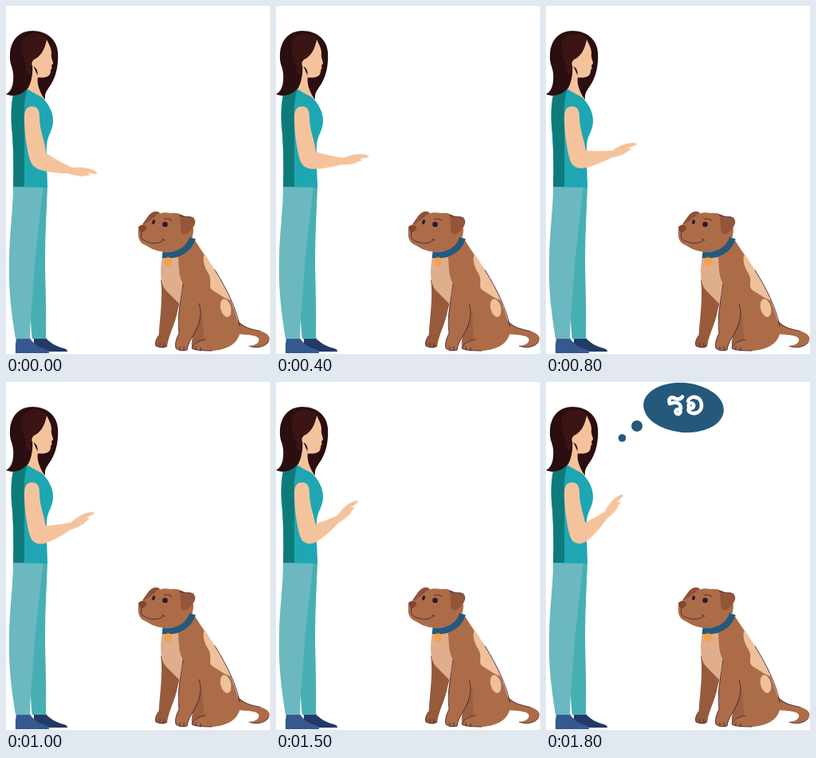
An HTML page for the animation above (3800 ms loop, 331 by 435 pixels).

```html
<!DOCTYPE html>
<html lang="en">
<head>
<meta charset="utf-8">
<title>Wait</title>
<style>
  html, body { margin: 0; width: 100%; height: 100%; overflow: hidden; background: #fff; }
  svg { display: block; width: 100%; height: 100%; }
  #forearm { transform-origin: 41px 192px; }
  .line { fill: none; stroke: #4a2635; stroke-width: .9; stroke-linecap: round; stroke-linejoin: round; }
  .glyph { fill: none; stroke: #fff; stroke-width: 4.6; stroke-linecap: round; stroke-linejoin: round; }
</style>
</head>
<body>
<svg viewBox="0 0 331 435">
  <g id="woman">
    <!-- shoes and trousers -->
    <path fill="#233a66" d="M35 415H50C54 420 63 426 73 428Q77 429 77 432H38Q34 424 35 415Z"/>
    <path fill="#34598f" d="M13 415H30C34 422 41 427 50 429Q54 430 54 434H12Q11 424 13 415Z"/>
    <path fill="#47afb3" d="M36 225H52C51 255 49 285 49 315C49 345 51 370 50 416H33C30 400 28 300 36 225Z"/>
    <path fill="#6bb8c0" d="M9 225H47C43 260 37 305 34.500 345C33 370 30 395 30 416H12C8 390 3 360 4 320C4 285 9 255 9 225Z"/>
    <!-- shirt -->
    <path fill="#1fa6b3" d="M27 103C35 108 44 111 48 117C54 124 59 133 59 143C59 157 52 160 51 175C50 192 52 210 52 227L9 226C10 200 9 178 8 160C6 143 6 125 9 111Z"/>
    <path fill="#0e7b7b" d="M27 103C23 115 22 130 23 150V226L9 226C10 200 9 178 8 160C6 143 6 125 9 111Z"/>
    <!-- head -->
    <path fill="#2a0e10" d="M33 31C51 31 64 42 65 58C66 73 63 87 57 97C52 105 48 108 49 117C45 113 41 108 39 103L27 103C21 110 10 115 0 110C8 107 10 95 9 84C8 75 4 72 5 60C6 42 17 31 33 31Z"/>
    <path fill="#3b1514" d="M51 41C43 31 25 33 20 45C16 56 24 67 25 79Q27 87 31 86L32 68C43 64 48 53 51 41Z"/>
    <path fill="#f5c39b" d="M33 72L40 88C38 98 43 108 48 116C40 111 33 108 27 104C32 96 34 84 33 72Z"/>
    <path fill="#f5c39b" d="M51 42C54 48 57 53 57 59C56 63 58 67 59 71Q59 73 57 74L57.500 78L56 80C56 84 55 88 49 89Q44 90 39 89C41 82 38 76 33 75Q31 70 35 67C44 63 49 53 51 42Z"/>
    <!-- arm -->
    <path fill="#f5c39b" d="M32 125.500C39 125 42 130 42 139C42 153 47 165 49 176L51 188L42 201C33 201 31 196 29 189C25 174 23 155 23 139C23 130 26 126 32 125.500Z"/>
    <path id="forearm" fill="#f5c39b" d="M36 181H50C62 183 75 183 84 183C89 180 94 177 101 175.500C107 174.500 112 174 114.500 176C116 178 110 179 103 181C106 181 108 182 107 183.500C102 184 101 188 95 189C90 191 86 191 82 192C72 196 61 201 47 203C37 204 32 198 31 193Z"/>
  </g>

  <g id="dog">
    <!-- tail and far foreleg -->
    <path fill="#ac6c48" d="M286 388C298 403 308 404 319 406.500C329 409 333 415 329 420C324 427 313 428 305 425C313 424 318 421 317 416C314 411 303 411 288 410Z"/>
    <path class="line" d="M292 396C302 404 310 404 319 406.500M305 425C313 428 324 427 329 420"/>
    <path fill="#975a3b" d="M194 342C197 365 193 388 191.500 412Q186 419 188 425Q197 429 202 425C204 411 212 398 215 382L224 345Z"/>
    <path class="line" d="M191.500 412Q186 419 188 425Q197 429 202 425M193 425V421M198 426V422"/>
    <!-- body -->
    <path fill="#ac6c48" d="M196 314C193 330 195 348 203 357C210 364 216 369 218 373C215 388 217 398 217 409Q211 420 213 428Q218 432 227 430Q229 420 235 412L233 428Q238 431 258 431C277 430 290 422 293 410C293 394 283 367 268 341C260 326 247 309 237 293Z"/>
    <path fill="#dfae8c" d="M196 315C192 335 194 350 202 357C209 364 215 370 218 373C221 364 222 355 222 347C216 338 217 325 216 314Z"/>
    <path fill="#efc19b" d="M249 310C256 320 262 331 268 341C274 351 279 360 282 368C275 366 267 360 260 356C252 351 260 343 253 333C248 325 246 315 249 310Z"/>
    <ellipse cx="275.500" cy="377.500" rx="6.500" ry="11.500" fill="#efc19b" transform="rotate(-14 275.500 377.500)"/>
    <path fill="#9c6040" d="M235 410C240 399 244 393 245 379C248 394 246 405 249 417L238 420Q234 423 233 428Q232 418 235 410Z"/>
    <path class="line" d="M222 347C220 366 214 388 217 409Q211 420 213 428Q218 432 227 430C228 420 235 413 239 404C243 396 246 382 242 372M250 417C242 418 235 422 233 428Q238 431 258 431M218 430V426M223 430V426M238 430V426M244 431V427M262 330C278 356 289 379 293 400"/>
    <!-- head -->
    <path fill="#8e5239" d="M171 273C176 266 180 258 186 257Q191 256 193 259L184 273Z"/>
    <path fill="#ac6c48" d="M182 267C188 259 197 257 207 259C219 257 231 265 235 279C235 290 230 300 219 304C209 309 191 308 182 303Q177 300 171 297C167 294 165 289 166 279C169 272 176 272 182 267Z"/>
    <path fill="#94563a" d="M217 261C224 265 230 262 235 265C240 269 236 276 232 280C228 285 225 286 221 285C218 279 220 272 217 261Z"/>
    <path class="line" d="M217 261C224 265 230 262 235 265"/>
    <path fill="#85462f" d="M166 276Q170 272 175 275Q178 278 173 282Q166 284 166 276Z"/>
    <ellipse cx="185" cy="270" rx="1.800" ry="3" fill="#2c1930" transform="rotate(12 185 270)"/>
    <circle cx="199.500" cy="273" r="3.300" fill="#2c1930"/>
    <path class="line" d="M170 282Q168 288 171 292C180 297 191 299 198 292M196 291L199 293"/>
    <path d="M198 267Q204 264 208 269M183 264L187 262" fill="none" stroke="#86362e" stroke-width="1.100"/>
    <!-- collar -->
    <path d="M196 311C214 313 229 306 234 290" fill="none" stroke="#25597d" stroke-width="8"/>
    <circle cx="203" cy="320" r="5" fill="#f5a04b"/>
    <path d="M200 315Q203 313 206 315" fill="none" stroke="#d98635" stroke-width="1"/>
  </g>

  <g id="thought" fill="#24597b" opacity="0" role="img" aria-label="รอ">
    <ellipse cx="172.500" cy="32" rx="50.500" ry="31" transform="rotate(5 172.500 32)"/>
    <circle cx="114" cy="55" r="7"/>
    <circle cx="95.500" cy="70" r="4.800"/>
    <g class="glyph">
      <path d="M155 27C153 20 157 18 162 20.500Q168 23 171 18.500M156 27C163 24 169 26 169 33"/>
      <circle cx="165.500" cy="37" r="3"/>
      <path d="M178 24C180 17 194 16 195 28C196 41 179 42 178.500 34"/>
      <circle cx="182" cy="29.500" r="3.200"/>
    </g>
  </g>
</svg>
<script>
  const LOOP = 3800, STEP = 100, LAST = 18, SEGMENT = 6;
  const poses = [25.3, 2.1, -15.7, -30.7]; // forearm angle at each key pose, degrees
  const ease = p => (p + p * p * (3 - 2 * p)) / 2;

  function angle(step) {
    const i = Math.min(Math.floor(step / SEGMENT), poses.length - 2);
    const p = ease((step - i * SEGMENT) / SEGMENT);
    return poses[i] + (poses[i + 1] - poses[i]) * p;
  }

  function hold(id, frames) {
    const held = frames.map(f => ({ ...f, easing: 'steps(1, end)' }));
    held.push({ ...held[held.length - 1], offset: 1 });
    const anim = document.getElementById(id).animate(held, { duration: LOOP, iterations: Infinity });
    anim.startTime = 0;
  }

  const swing = Array.from({ length: LAST + 1 }, (_, k) => ({
    offset: k * STEP / LOOP,
    transform: `rotate(${angle(k).toFixed(2)}deg)`
  }));

  hold('forearm', swing);
  hold('thought', [{ offset: 0, opacity: 0 }, { offset: LAST * STEP / LOOP, opacity: 1 }]);
</script>
</body>
</html>
```
